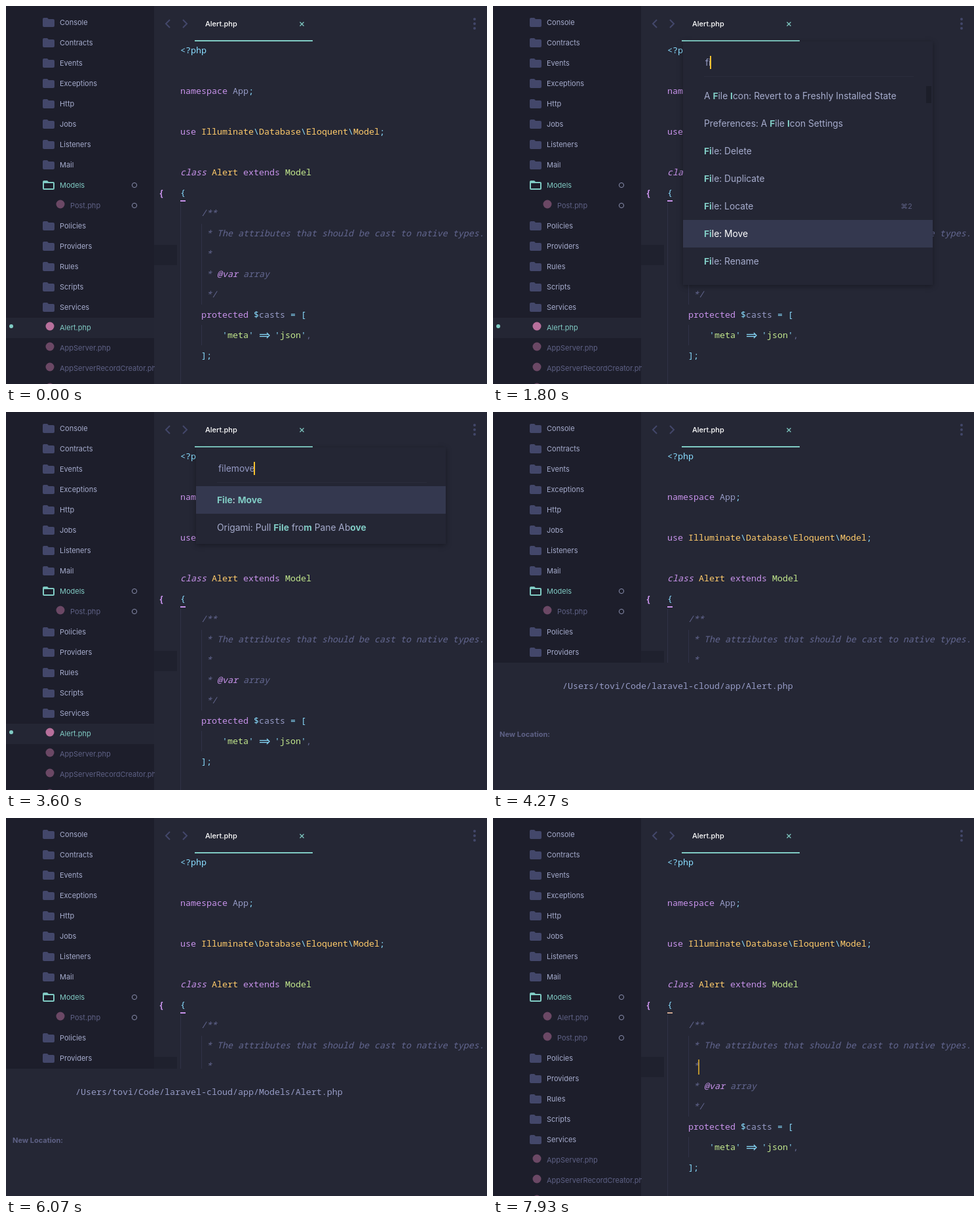
Write an HTML page with a canvas that moves like this. It is 734x576 px and loops after 8 s.

```html
<!DOCTYPE html>
<html lang="en">
<head>
<meta charset="utf-8">
<title>Moving a file in an editor</title>
<style>
  html, body { margin: 0; width: 100%; height: 100%; overflow: hidden; background: #252735; }
  canvas { display: block; }
</style>
</head>
<body>
<canvas id="stage" width="734" height="576"></canvas>
<script>
const ctx = document.getElementById('stage').getContext('2d');
const LOOP = 8000;
const ROW = 31;
const UI = 'Inter, sans-serif';
const PALETTE_FONT = '13.8px ' + UI;
const MONO = '13.333px "Noto Sans Mono", "DejaVu Sans Mono", monospace';
const C = {
  editor: '#252735', sidebar: '#1d1e2b', active: '#242634', selected: '#34384f',
  text: '#a6accd', plain: '#959ac4', dim: '#5e6185', comment: '#636790', faint: '#43476a',
  guide: '#303247', teal: '#80cbc4', cyan: '#89ddff', purple: '#c792ea', yellow: '#ffcb6b',
  green: '#c3e88d', caret: '#f8c12d', white: '#ffffff'
};

// When each step of the session happens, in ms.
const PALETTE_OPEN = 1250, PANEL_OPEN = 3750, MOVED = 7400;
const QUERY = 'filemove', QUERY_KEYS = [1600, 1720, 1880, 1980, 2080, 2170, 2270, 2400];
const FOLDER = 'Models/', FOLDER_KEYS = [4890, 4990, 5090, 5200, 5300, 5420, 5640];
const CARET_JUMPS = [4500, 4650];
const EDITOR_BLINK = 6480;

const COMMANDS = [
  'A File Icon: Revert to a Freshly Installed State',
  'Preferences: A File Icon Settings',
  'File: Delete', 'File: Duplicate', 'File: Locate', 'File: Move', 'File: Rename'
];
const MATCHES = ['File: Move', 'Origami: Pull File from Pane Above'];

const CODE = [
  [0, 0, ['<?php', C.cyan]],
  [2, 0, ['namespace ', C.purple], ['App', C.plain], [';', C.cyan]],
  [4, 0, ['use ', C.purple], ['Illuminate', C.yellow], ['\\', C.cyan], ['Database', C.yellow],
    ['\\', C.cyan], ['Eloquent', C.yellow], ['\\', C.cyan], ['Model', C.yellow], [';', C.cyan]],
  [6, 0, ['class ', C.purple, 'italic'], ['Alert ', C.yellow], ['extends ', C.purple], ['Model', C.green]],
  [7, 0, ['{', C.cyan]],
  [8, 4, ['/**', C.comment, 'italic']],
  [9, 5, ['* The attributes that should be cast to native types.', C.comment, 'italic']],
  [10, 5, ['*', C.comment, 'italic']],
  [11, 5, ['* ', C.comment, 'italic'], ['@var ', C.purple, 'italic'], ['array', C.comment, 'italic']],
  [12, 5, ['*/', C.comment, 'italic']],
  [13, 4, ['protected ', C.purple], ['$', C.cyan], ['casts ', C.plain], ['= [', C.cyan]],
  [14, 8, ["'", C.cyan], ['meta', C.green], ["'    '", C.cyan], ['json', C.green], ["'", C.cyan], [',', C.comment]],
  [15, 4, ['];', C.cyan]]
];

const keysPressed = (times, t) => times.filter(time => t >= time).length;

function rect(x, y, w, h, color) {
  ctx.fillStyle = color;
  ctx.fillRect(x, y, w, h);
}

function disc(x, y, r, color) {
  ctx.fillStyle = color;
  ctx.beginPath();
  ctx.arc(x, y, r, 0, 7);
  ctx.fill();
}

function line(color, width, ...points) {
  ctx.strokeStyle = color;
  ctx.lineWidth = width;
  ctx.beginPath();
  points.forEach(([x, y]) => ctx.lineTo(x, y));
  ctx.stroke();
}

// Writes one piece of text and returns where it ends.
function write(text, x, y, font, color) {
  ctx.font = font;
  ctx.fillStyle = color;
  ctx.fillText(text, x, y);
  return x + ctx.measureText(text).width;
}

function clipped(x, y, w, h, draw) {
  ctx.save();
  ctx.beginPath();
  ctx.rect(x, y, w, h);
  ctx.clip();
  draw();
  ctx.restore();
}

// The caret fades in and out, starting solid at the last key press.
function caret(x, y, h, t, lastKey) {
  const phase = Math.cos((t - lastKey) / 1200 * 2 * Math.PI);
  ctx.globalAlpha = Math.max(0, Math.min(1, 0.5 + 0.8 * phase));
  rect(x, y, 2, h, C.caret);
  ctx.globalAlpha = 1;
}

function folder(y, open) {
  const outline = new Path2D(`M58 ${y - 7}h5l2 2h7q2 0 2 2v8q0 2-2 2h-14q-2 0-2-2v-10q0-2 2-2z`);
  ctx.fillStyle = open ? C.teal : C.faint;
  ctx.fill(outline);
  if (open) rect(58, y - 3, 14, 8, C.sidebar);
}

function treeRow(name, y, { nested, active, open } = {}) {
  const isFile = name.endsWith('.php');
  if (active) {
    rect(0, y - 15, 226, ROW, C.active);
    disc(8, y - 2, 3, C.teal);
  }
  if (isFile) disc(nested ? 83 : 67, y - 2, 6.5, active ? '#b8709c' : '#6b4865');
  else folder(y, open);
  const color = active || open ? C.teal : isFile ? C.dim : C.text;
  write(name, nested ? 98 : 82, y + 4, '11px ' + UI, color);
  if (nested || open) {
    ctx.strokeStyle = '#8b90b0';
    ctx.lineWidth = 1;
    ctx.beginPath();
    ctx.arc(196, y, 3.6, 0, 7);
    ctx.stroke();
  }
}

function sidebar(moved) {
  rect(0, 0, 226, 576, C.sidebar);
  const rows = ['Console', 'Contracts', 'Events', 'Exceptions', 'Http', 'Jobs', 'Listeners', 'Mail']
    .map(name => [name]);
  rows.push(['Models', { open: true }]);
  if (moved) rows.push(['Alert.php', { nested: true }]);
  rows.push(['Post.php', { nested: true }]);
  ['Policies', 'Providers', 'Rules', 'Scripts', 'Services'].forEach(name => rows.push([name]));
  if (!moved) rows.push(['Alert.php', { active: true }]);
  rows.push(['AppServer.php'], ['AppServerRecordCreator.php'], ['AppServerTask.php']);
  clipped(0, 0, 227, 576, () => rows.forEach(([name, state], i) => treeRow(name, 25 + ROW * i, state)));
}

function tabBar() {
  line(C.faint, 2, [250, 21], [244, 27], [250, 33]);
  line(C.faint, 2, [270, 21], [276, 27], [270, 33]);
  write('Alert.php', 304, 31, '500 11px ' + UI, C.white);
  line(C.teal, 1.2, [448.5, 24.5], [454.5, 30.5]);
  line(C.teal, 1.2, [454.5, 24.5], [448.5, 30.5]);
  rect(288, 52, 180, 2, C.teal);
  [20, 27, 34].forEach(y => disc(715, y, 2, C.faint));
}

function editor(moved) {
  rect(226, 364, 35, ROW, '#1f212e');
  rect(266, 300, 1, 276, C.guide);
  rect(298, 332, 1, 123, C.guide);
  rect(298, 486, 1, 31, C.guide);
  write('{', 233, 290, 'bold ' + MONO, C.purple);
  for (const [row, indent, ...parts] of CODE) {
    let x = 266 + 8 * indent;
    for (const [text, color, style = 'normal'] of parts) {
      x = write(text, x, 72 + ROW * row, `${style} 500 ${MONO}`, color);
    }
  }
  rect(266, 296, 8, 2, moved ? '#cba48d' : C.purple);
  line(C.cyan, 1.3, [387, 500.5], [400, 500.5]);
  line(C.cyan, 1.3, [387, 503.5], [400, 503.5]);
  line(C.cyan, 1.3, [398, 498], [402, 502], [398, 506]);
}

// Indices of the letters in a command that match the query.
function matched(label, query) {
  const start = label.indexOf('File');
  if (query === 'fi' && label.includes('File Icon')) return [start, start + 5];
  const hits = [];
  let at = start - 1;
  for (const letter of query) hits.push(at = label.toLowerCase().indexOf(letter, at + 1));
  return hits;
}

function commandRow(label, top, query, selected) {
  if (selected) rect(290, top, 381, 42, C.selected);
  const hits = matched(label, query);
  let x = 322;
  for (let i = 0; i < label.length;) {
    const hit = hits.includes(i);
    let end = i + 1;
    while (end < label.length && hits.includes(end) === hit) end++;
    x = write(label.slice(i, end), x, top + 26, `${hit ? 700 : 400} ${PALETTE_FONT}`,
      hit ? C.teal : selected ? C.white : C.text);
    i = end;
  }
  if (label === 'File: Locate') write('⌘2', 622, top + 25, '11px ' + UI, C.dim);
}

function palette(t) {
  const typed = keysPressed(QUERY_KEYS, t);
  const query = QUERY.slice(0, typed);
  const narrowed = typed > 4;
  const labels = narrowed ? MATCHES : COMMANDS;
  const top = narrowed ? 113 : 116;
  ctx.save();
  ctx.shadowColor = 'rgba(0,0,0,.35)';
  ctx.shadowBlur = 8;
  ctx.shadowOffsetY = 2;
  rect(290, 54, 381, narrowed ? 147 : 371, C.active);
  ctx.restore();
  rect(322, 107, 320, 1, '#2a2c3b');
  const end = write(query, 324, 91, PALETTE_FONT, C.plain);
  caret(Math.round(end) - 1, 76, 20, t, QUERY_KEYS[typed - 1] ?? PALETTE_OPEN);
  labels.forEach((label, i) =>
    commandRow(label, top + 42 * i, query, label === 'File: Move'));
  if (!narrowed) rect(661, 122, 8, 26, '#1c1e29');
}

function locationPanel(t) {
  const base = '/Users/tovi/Code/laravel-cloud/app/';
  const typed = keysPressed(FOLDER_KEYS, t);
  const jumps = keysPressed(CARET_JUMPS, t);
  const column = base.length + typed + [9, 6, 0][jumps];
  const lastKey = FOLDER_KEYS[typed - 1] ?? CARET_JUMPS[jumps - 1] ?? PANEL_OPEN;
  rect(0, 382, 734, 194, C.editor);
  write(base + FOLDER.slice(0, typed) + 'Alert.php', 106, 422, '500 ' + MONO, C.plain);
  caret(105 + 8 * column, 408, 23, t, lastKey);
  write('New Location:', 10, 495, 'bold 11px ' + UI, C.dim);
}

function draw(t) {
  const moved = t >= MOVED;
  rect(0, 0, 734, 576, C.editor);
  sidebar(moved);
  tabBar();
  editor(moved);
  if (t < PALETTE_OPEN || moved) caret(313, 368, 23, t, EDITOR_BLINK);
  else if (t < PANEL_OPEN) palette(t);
  else locationPanel(t);
}

const started = performance.now();
function frame() {
  draw((performance.now() - started) % LOOP);
  requestAnimationFrame(frame);
}
frame();
</script>
</body>
</html>
```
